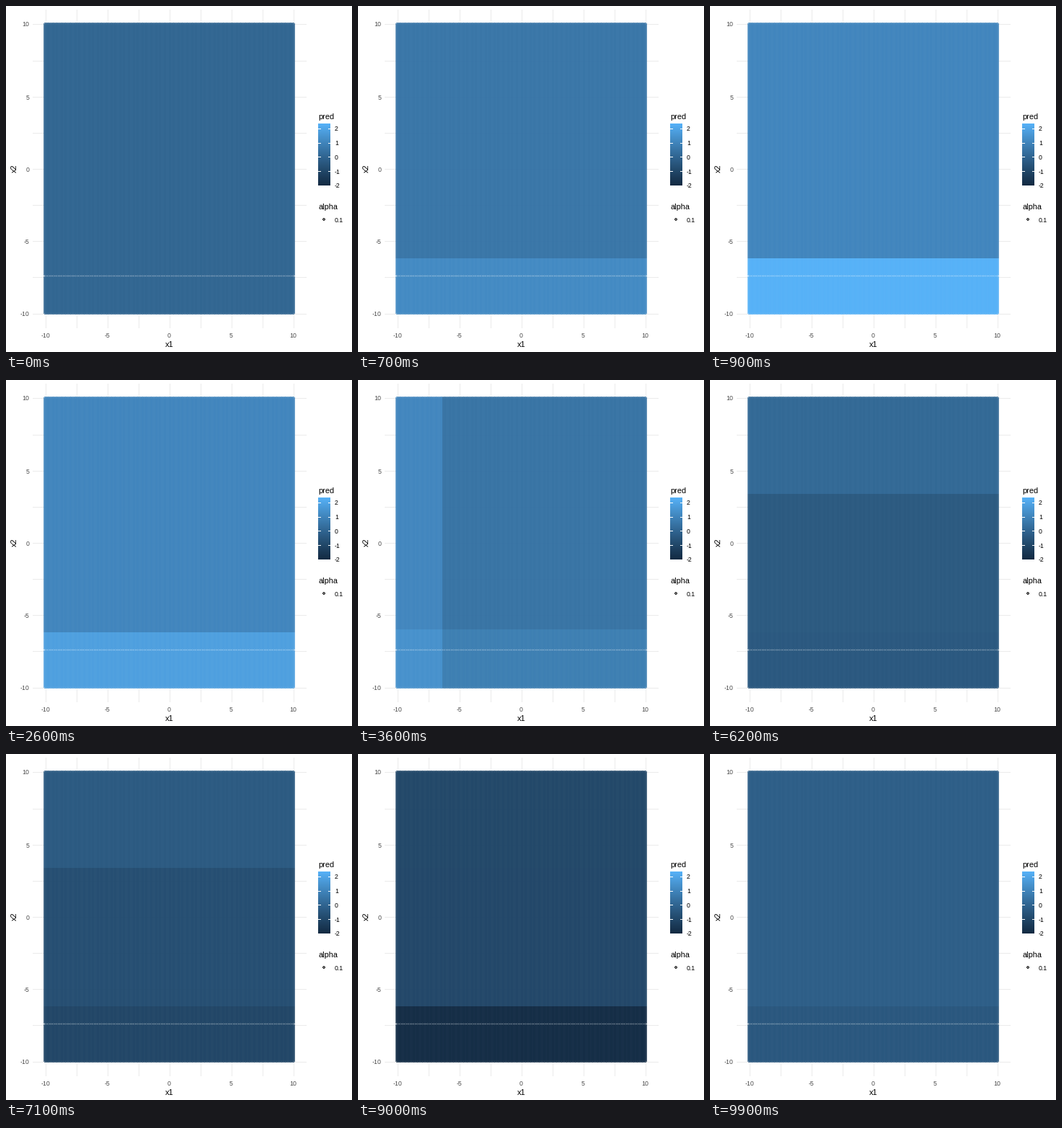
A matplotlib script that plays this animation: 480 px wide and 480 px high, repeating every 10000 ms.

```python
import numpy as np
import matplotlib.pyplot as plt
from matplotlib.animation import FuncAnimation

plt.rcParams["font.family"] = "Liberation Sans"
SIZE, DPI = 480, 100
PX = 72 / DPI  # points per pixel
LOW, HIGH = -2.03, 2.32
ALPHA = 0.55

# --- colour scale, interpolated in CIE Lab ---
TO_XYZ = np.array([[0.4124564, 0.3575761, 0.1804375],
                   [0.2126729, 0.7151522, 0.0721750],
                   [0.0193339, 0.1191920, 0.9503041]])
WHITE = TO_XYZ.sum(axis=1)


def rgb_to_lab(rgb):
    rgb = np.asarray(rgb) / 255
    lin = np.where(rgb > 0.04045, ((rgb + 0.055) / 1.055) ** 2.4, rgb / 12.92)
    t = TO_XYZ @ lin / WHITE
    f = np.where(t > 0.008856, np.cbrt(t), 7.787 * t + 16 / 116)
    return np.array([116 * f[1] - 16, 500 * (f[0] - f[1]), 200 * (f[1] - f[2])])


def lab_to_rgb(lab):
    fy = (lab[..., 0] + 16) / 116
    f = np.stack([fy + lab[..., 1] / 500, fy, fy - lab[..., 2] / 200], -1)
    t = np.where(f > 0.2069, f ** 3, (f - 16 / 116) / 7.787)
    lin = np.clip((t * WHITE) @ np.linalg.inv(TO_XYZ).T, 0, 1)
    return np.where(lin > 0.0031308, 1.055 * lin ** (1 / 2.4) - 0.055, 12.92 * lin)


DARK, LIGHT = rgb_to_lab((0x13, 0x2B, 0x43)), rgb_to_lab((0x56, 0xB1, 0xF7))


def shade(value):
    k = np.clip((np.asarray(value) - LOW) / (HIGH - LOW), 0, 1)[..., None]
    return lab_to_rgb(DARK + (LIGHT - DARK) * k)


# --- predictions: four horizontal bands, left and right of the x1 split ---
def bands(top, mid, low):
    return [[top] * 2, [mid] * 2, [mid] * 2, [low] * 2]


STATES = np.array([
    bands(0, 0, 0),
    bands(1.02, 1.02, HIGH),
    bands(1.02, 1.02, 2.28),
    bands(1.02, 1.02, 1.65),
    [[1.05, 0.45], [1.05, 0.45], [1.38, 0.78], [1.38, 0.78]],
    bands(0.52, -0.05, -0.05),
    bands(0.38, -0.18, -0.18),
    bands(-0.2, -0.65, -0.75),
    bands(-0.6, -0.95, -1.42),
    bands(-0.95, -1.0, -1.75),
    bands(-1.05, -1.05, LOW),
])
STARTS = [0, 9, 18, 27, 36, 46, 55, 64, 73, 82, 91, 100]
MOVE = 4  # steps from one state to the next


def prediction(frame):
    k = np.searchsorted(STARTS, frame, side="right") - 1
    mix = max(0, frame - (STARTS[k + 1] - MOVE)) / MOVE
    return STATES[k] * (1 - mix) + STATES[(k + 1) % len(STATES)] * mix


# --- point cloud: overlapping translucent dots on whole pixels ---
LEFT, RIGHT, TOP, BOTTOM = 52, 401, 23, 428
DOT = np.array([[0, 2, 2, 0], [2, 1, 1, 2], [2, 1, 1, 2], [0, 2, 2, 0]])
step = np.arange(201)
cols = np.floor(54.2 + 1.723 * step + 0.5).astype(int) - LEFT
rows = 25 + 2 * step + (step > 174) - TOP

layers = np.zeros((BOTTOM - TOP, RIGHT - LEFT))
for dy in range(4):
    for dx in range(4):
        layers[np.ix_(rows + dy - 2, cols + dx - 2)] += DOT[dy, dx]
seam = rows[175] - 2
layers[seam, 1:-1] = 1
layers[seam, cols] = 3
opacity = 1 - (1 - ALPHA) ** layers

band_of = np.searchsorted([158, 346, 350], np.arange(TOP, BOTTOM), side="right")
side_of = (np.arange(LEFT, RIGHT) >= 117).astype(int)


def cloud(frame):
    rgb = shade(prediction(frame))[np.ix_(band_of, side_of)]
    return np.dstack([rgb, opacity])


# --- stage ---
fig = plt.figure(figsize=(SIZE / DPI, SIZE / DPI), dpi=DPI, facecolor="white")
ax = fig.add_axes([0, 0, 1, 1])
ax.axis("off")


def line(xs, ys, color):
    ax.plot(xs, ys, color=color, lw=PX, solid_capstyle="butt", antialiased=False)


def label(x, y, text, size=8.8, color="black", **kw):
    ax.text(x, y, text, fontsize=size * PX, color=color, **kw)


def picture(data, x0, x1, y0, y1, z=3):
    return ax.imshow(data, extent=(x0, x1, y1, y0), interpolation="nearest",
                     aspect="auto", zorder=z)


def x_at(v):
    return round(226.5 + 17.23 * v - 0.5) + 0.5


def y_at(v):
    return round(225.5 - 20.05 * v - 0.5) + 0.5


for v in np.arange(-10, 10.1, 2.5):
    line([x_at(v)] * 2, [5, 446], "#ebebeb")
    line([37, 416], [y_at(v)] * 2, "#ebebeb")
for v in range(-10, 11, 5):
    label(x_at(v), 460, str(v), color="#4d4d4d", ha="center")
    label(32.5, y_at(v) + 4, str(v), color="#4d4d4d", ha="right")
label(227, 473, "x1", 11, ha="center")
label(11.5, 225.5, "x2", 11, ha="center", va="center", rotation=90)

# legends
BAR_TOP, BAR_BOTTOM = 163, 249
label(433, 157, "pred", 11)
ramp = shade(np.linspace(HIGH, LOW, BAR_BOTTOM - BAR_TOP))[:, None, :]
picture(ramp, 433, 450, BAR_TOP, BAR_BOTTOM, z=1)
for v in range(-2, 3):
    y = BAR_BOTTOM - (v - LOW) / (HIGH - LOW) * (BAR_BOTTOM - BAR_TOP)
    for x in (433, 446.6):
        line([x, x + 3.4], [np.floor(y) + 0.5] * 2, "white")
    label(456, y + 4, str(v))

label(433, 282, "alpha", 11)
dot = np.zeros((4, 4, 4))
dot[..., 3] = 1 - (1 - ALPHA) ** DOT
picture(dot, 439, 443, 294, 298)
label(456, 300, "0.1")

points = picture(cloud(0), LEFT, RIGHT, TOP, BOTTOM)
ax.set_xlim(0, SIZE)
ax.set_ylim(SIZE, 0)


def update(frame):
    points.set_data(cloud(frame))
    return [points]


anim = FuncAnimation(fig, update, frames=100, interval=100, repeat=True,
                     repeat_delay=0, blit=False)
plt.show()
```
